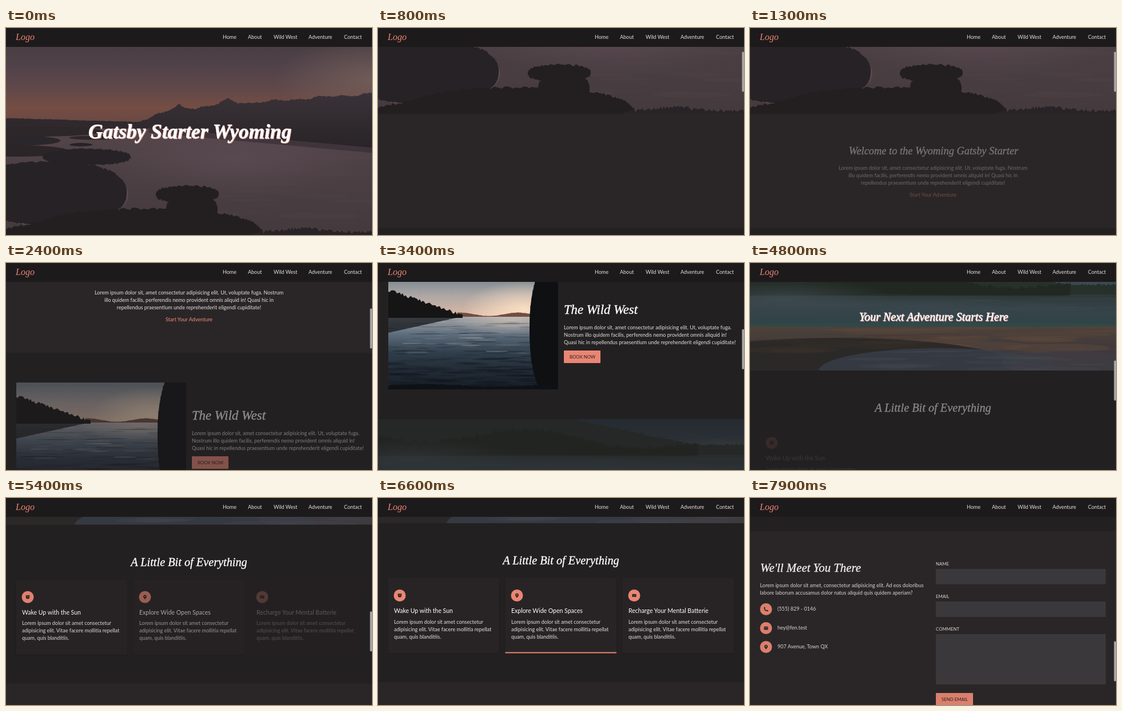
These frames come from a looping animation (640x362 px, 8 s). An HTML page:

```html
<!DOCTYPE html>
<html lang="en">
<head>
<meta charset="utf-8">
<title>Gatsby Starter Wyoming</title>
<style>
html, body { margin: 0; width: 100%; height: 100%; overflow: hidden; background: #232021; }
#stage { display: block; width: 640px; height: 362px; }
text { font: 9px Lato, "Open Sans", sans-serif; fill: #e4e0e0; white-space: pre; }
.script { font-family: "Liberation Serif", "Noto Serif", serif; font-style: italic; fill: #fff; stroke: #fff; stroke-width: .35px; }
.glow { filter: drop-shadow(1px 1px 0 #e9a097); }
.mid { text-anchor: middle; }
.caps { font-size: 7.85px; }
.title { font-size: 10.5px; fill: #fff; }
.dark { fill: #2a2021; }
.link { fill: #ec8e78; }
</style>
</head>
<body>
<svg id="stage" viewBox="0 0 640 362" xmlns="http://www.w3.org/2000/svg"></svg>
<script>
const LOOP = 8000, CORAL = '#e98673', PANEL = '#2a2627', DEEP = '#232021', INK = '#2c2324';

// Timeline: scroll moves (start -> offset), fade-in starts and card hovers
const MOVE = 600, FADE = 700, HOVER = 500;
const MOVES = { 200: 212, 1800: 405, 2750: 590, 3800: 870, 4850: 1014, 7200: 1278 };
const FADES = { welcome: 1050, wild: 2060, spring: 3050, little: 4480, card0: 4730, card1: 4980, card2: 5230, contact: 7250 };
const hoverStart = i => 5700 + HOVER * i;

const ramp = (t, start, length) => Math.max(0, Math.min(1, (t - start) / length));
const smooth = u => u * u * (3 - 2 * u);

function seeded(seed) {
  return () => (seed = (seed * 16807) % 2147483647) / 2147483647;
}

const rect = (x, y, w, h, fill, more = '') =>
  `<rect x="${x}" y="${y}" width="${w}" height="${h}" fill="${fill}" ${more}/>`;
const oval = (x, y, rx, ry, fill, alpha = 1) =>
  `<ellipse cx="${x}" cy="${y}" rx="${rx}" ry="${ry}" fill="${fill}" opacity="${alpha}"/>`;
const text = (x, y, s, cls = '', style = '') =>
  `<text x="${x}" y="${y}" class="${cls}" style="${style}">${s}</text>`;
const lines = (x, y, list, cls) => list.map((s, i) => text(x, y + 13 * i, s, cls)).join('');
const script = (x, y, size, s, cls = '', style = '') =>
  text(x, y, s, 'script ' + cls, `font-size:${size}px;${style}`);
const group = (id, body) => `<g id="${id}">${body}</g>`;
const frame = (x, y, w, h, body) => `<svg x="${x}" y="${y}" width="${w}" height="${h}">${body}</svg>`;

// Colours are spread evenly from top to bottom
const gradient = (id, ...colors) => `<linearGradient id="${id}" x2="0" y2="1">` +
  colors.map((c, i) => `<stop offset="${i / (colors.length - 1)}" stop-color="${c}"/>`).join('') + '</linearGradient>';
const halo = (id, color) => `<radialGradient id="${id}"><stop stop-color="${color}"/>
  <stop offset="1" stop-color="${color}" stop-opacity="0"/></radialGradient>`;

// Land between two curves, its top edge roughened by trees or rock
function ridge(x0, x1, top, bottom, rise, fill, alpha = 1) {
  const rnd = seeded(x0 * 7 + x1 + rise * 100), upper = [], lower = [];
  for (let x = x0; x <= x1; x += 2.5) {
    upper.push(`${x},${(top(x) - rise * rnd()).toFixed(1)}`);
    lower.unshift(`${x},${bottom(x).toFixed(1)}`);
  }
  return `<polygon points="${upper.concat(lower).join(' ')}" fill="${fill}" opacity="${alpha}"/>`;
}

// Wooded oval with a spiky outline
function grove(cx, cy, rx, ry, rise, fill) {
  const rnd = seeded(cx + cy * 3), n = Math.round((rx + ry) * 1.4);
  const pts = Array.from({ length: n }, (_, i) => {
    const a = i / n * 2 * Math.PI;
    const spread = v => Math.sign(v) * Math.abs(v) ** .85;
    return `${(cx + rx * spread(Math.cos(a))).toFixed(1)},${(cy + ry * spread(Math.sin(a)) - rise * rnd()).toFixed(1)}`;
  });
  return `<polygon points="${pts.join(' ')}" fill="${fill}"/>`;
}

// Scattered flat streaks, growing towards the viewer
function streaks(count, x, y, w, h, size, fill, alpha, seed) {
  const rnd = seeded(seed);
  return Array.from({ length: count }, () => {
    const v = rnd(), rx = size * (.4 + rnd());
    return oval((x + w * rnd()).toFixed(1), (y + h * v).toFixed(1), rx.toFixed(1),
      (rx * (.02 + .06 * v)).toFixed(1), fill, (alpha * (.3 + rnd())).toFixed(2));
  }).join('');
}

const defs = `<defs>
  ${gradient('dusk', '#493e43', '#51424a', '#5f484a', '#754d43', '#654744')}
  ${gradient('lake', '#54464b', '#4a3e42', '#443a3d')}
  ${gradient('peak', '#3a3238', '#292428')}
  ${gradient('dawn', '#76868f', '#b0a8a5', '#dcb9a4')}
  ${gradient('water', '#a5a5aa', '#5d6d7c', '#303e4b', '#222b35', '#171d25')}
  ${gradient('sky', '#273642', '#39474e')}
  ${gradient('mist', '#28332f', '#323e42', '#344349', '#2e4446')}
  ${gradient('shore', '#4d433a', '#41393a', '#3a3538')}
  ${halo('warm', '#76605a')}${halo('sheen', '#62515a')}${halo('sun', '#ffe3c6')}${halo('fog', '#46535a')}
</defs>`;

const WOODS = '#272225';
const peaks = x => 172 - 56 * Math.sqrt(Math.max(0, x - 225) / 415)
  - 12 * [302, 388].reduce((sum, p) => sum + Math.exp(-Math.abs(x - p) / 18), 0)
  - 2.5 * Math.sin(x / 9) * Math.sin(x / 23);
const farShore = x => 172 + Math.max(0, x - 225) * .09;

const hero = frame(0, 0, 640, 362,
  rect(0, 33, 640, 142, 'url(#dusk)') +
  oval(640, 90, 170, 75, 'url(#warm)', .8) +
  rect(0, 172, 640, 190, 'url(#lake)') +
  oval(400, 230, 230, 70, 'url(#sheen)', .5) +
  streaks(40, 220, 205, 420, 130, 60, '#5a4b50', .12, 5) +
  ridge(0, 250, x => 158 + x * .03, () => 176, 1, '#2f292d') +
  ridge(225, 640, peaks, farShore, 2.5, 'url(#peak)') +
  ridge(250, 640, farShore, x => farShore(x) + 9, 0, '#332b30', .6) +
  oval(50, 181, 120, 9, '#2d272a') + oval(20, 197, 75, 9, '#2b2629') +
  oval(155, 192, 45, 3.5, '#2d272a') + oval(131, 204, 20, 3, WOODS) + oval(20, 215, 90, 10, '#2b2528') +
  grove(141, 227, 77, 14, 3, WOODS) +
  oval(78, 292, 136, 55, '#594a4d') +
  grove(76, 290, 135, 55, 3, WOODS) +
  grove(317, 293, 55, 15, 4, '#231f21') +
  grove(325, 318, 45, 26, 2, '#231f21') +
  grove(245, 366, 205, 48, 4, '#231f21') +
  ridge(0, 150, x => 352 - x * .18, () => 362, 4, '#231f21') +
  ridge(430, 640, x => 357 + 3 * Math.sin(x / 30), () => 364, 6, '#282326')) +
  script(321.5, 193, 35.4, 'Gatsby Starter Wyoming', 'mid glow', 'font-weight:bold');

const welcome = rect(0, 362, 640, 201, PANEL) + group('welcome',
  script(321, 433, 18.4, 'Welcome to the Wyoming Gatsby Starter', 'mid') +
  lines(320, 459.5, ['Lorem ipsum dolor sit, amet consectetur adipisicing elit. Ut, voluptate fuga. Nostrum',
    'illo quidem facilis, perferendis nemo provident omnis aliquid in! Quasi hic in',
    'repellendus praesentium unde reprehenderit eligendi cupiditate!'], 'mid') +
  text(320, 507, 'Start Your Adventure', 'mid link'));

const button = (y, w, s) => rect(325, y, w, 22, CORAL, 'rx="1"') + text(335, y + 13.8, s, 'caps dark');

const treeline = x => 26 + x * .34;
const sunset = frame(18, 614, 297, 197,
  rect(0, 0, 297, 70, 'url(#dawn)') +
  oval(238, 58, 110, 50, 'url(#sun)', .9) +
  rect(0, 69, 297, 128, 'url(#water)') +
  oval(215, 76, 100, 28, 'url(#sun)', .4) +
  streaks(150, -10, 76, 300, 118, 26, '#10171f', .35, 7) +
  streaks(50, 40, 74, 200, 60, 18, '#c3bbb8', .25, 17) +
  ridge(120, 250, x => 66 - 3 * Math.sin(x / 16), () => 70, .5, '#6f4f42') +
  ridge(0, 130, x => 70, x => 98 - x * .22, 0, '#15191d', .75) +
  ridge(0, 130, treeline, () => 72, 6, '#151515') +
  grove(303, 95, 56, 130, 5, '#0e1012') +
  ridge(0, 297, x => 191 - 2 * Math.sin(x / 40), () => 197, 2, '#0e1116'));

const wild = rect(0, 562, 640, 302, DEEP) + group('wild', sunset +
  script(325, 679, 22.7, 'The Wild West') +
  lines(325, 705.5, ['Lorem ipsum dolor sit, amet consectetur adipisicing elit. Ut, voluptate fuga.',
    'Nostrum illo quidem facilis, perferendis nemo provident omnis aliquid in!',
    'Quasi hic in repellendus praesentium unde reprehenderit eligendi cupiditate!']) +
  button(743, 64, 'BOOK NOW'));

const slope = x => Math.max(-5, Math.min(47, (x - 330) * .21));
const spring = rect(0, 863, 640, 196, DEEP) + group('spring', frame(0, 863, 640, 195,
  rect(0, 0, 640, 60, 'url(#sky)') +
  oval(600, 44, 90, 14, 'url(#fog)', .6) +
  rect(0, 56, 640, 62, 'url(#mist)') +
  ridge(0, 640, slope, () => 62, 4, '#27302b') +
  ridge(0, 560, x => 34 + 10 * Math.sin(x / 55) + slope(x) * .4, () => 64, 7, '#20261f', .8) +
  oval(60, 68, 190, 34, 'url(#fog)', .6) + oval(300, 82, 240, 22, 'url(#fog)', .35) +
  streaks(16, 0, 62, 640, 40, 90, '#3d4a50', .3, 23) +
  rect(0, 116, 640, 79, 'url(#shore)') +
  oval(320, 115, 400, 4, '#30494a', .8) +
  streaks(30, 200, 120, 440, 36, 80, '#5c473b', .4, 29) +
  oval(150, 186, 310, 48, '#2b2926', .95) +
  streaks(14, 0, 132, 330, 30, 70, '#3a3029', .5, 31) +
  oval(330, 196, 210, 40, '#383f49', .8) +
  oval(560, 182, 120, 22, '#403f47', .6) +
  streaks(24, 180, 158, 420, 36, 50, '#4a4f58', .25, 37)) +
  script(321, 971, 20, 'Your Next Adventure Starts Here', 'mid glow'));

// Small glyphs centred on the origin
const mark = (d, width = .7, color = CORAL) => `<path d="${d}" fill="none" stroke="${color}" stroke-width="${width}"/>`;
const GLYPHS = {
  clock: oval(0, 0, 3.2, 3.2, INK) + mark('M-3.6-2.2L-2-3.6M3.6-2.2L2-3.6', 1, INK) + mark('M0-1.6V.3H1.4'),
  pin: `<path d="M0 4.2L-2.7 .6A3 3 0 1 1 2.7 .6Z" fill="${INK}"/>` + oval(0, -.9, 1.1, 1.1, CORAL),
  power: rect(-3.6, -2.6, 7.2, 5.2, INK, 'rx=".8"') + mark('M-1.8 .2L-.4 1.2L1.6-1.2'),
  phone: mark('M-2.9-2.6Q-2.6 2.6 2.6 2.9', 1.5, INK) + mark('M-3.3-2.3L-1.5-2.9M2.3 3.3L2.9 1.5', 2.2, INK),
  mail: rect(-3.6, -2.7, 7.2, 5.6, INK, 'rx=".7"') + mark('M-3.2-1.7L0 .5L3.2-1.7')
};
const badge = (x, y, name) =>
  `<g transform="translate(${x} ${y})">${oval(0, 0, 10.5, 10.5, CORAL)}${GLYPHS[name]}</g>`;

const CARDS = [['clock', 'Wake Up with the Sun'], ['pin', 'Explore Wide Open Spaces'], ['power', 'Recharge Your Mental Batterie']];
function card([icon, title], i) {
  const x = 17.5 + 205 * i;
  return group('card' + i,
    rect(x - 1, 1154, 196.5, 133, '#1d1a1b', 'rx="2" opacity=".5"') +
    rect(x, 1154, 194.5, 131.5, '#282425') +
    badge(x + 20.5, 1184.5, icon) +
    text(x + 10.5, 1215, title, 'title') +
    lines(x + 10.5, 1233.5, ['Lorem ipsum dolor sit amet consectetur',
      'adipisicing elit. Vitae facere mollitia repellat', 'quam, quis blanditiis.']) +
    rect(x, 1283.5, 0, 2, CORAL, `id="bar${i}"`));
}
const cards = rect(0, 1058, 640, 279, DEEP) +
  group('little', script(320, 1130, 20.3, 'A Little Bit of Everything', 'mid')) +
  CARDS.map(card).join('');

const field = (y, h, label) => text(325, y - 6, label, 'caps') + rect(325, y, 297, h, '#3d3a3d');
const DETAILS = [['phone', '(555) 829 - 0146'], ['mail', 'hey@fen.test'], ['pin', '907 Avenue, Town QX']];
const contact = rect(0, 1336, 640, 540, PANEL) + group('contact',
  script(18, 1407, 20.8, "We'll Meet You There") +
  lines(17.5, 1433.5, ['Lorem ipsum dolor sit amet, consectetur adipisicing elit. Ad eos doloribus',
    'labore laborum accusamus dolor natus aliquid quis quidem aperiam?']) +
  DETAILS.map(([icon, s], i) => badge(28, 1472.5 + 33 * i, icon) + text(48, 1475.3 + 33 * i, s)).join('') +
  field(1402, 27, 'NAME') + field(1459, 27, 'EMAIL') + field(1516, 88, 'COMMENT') +
  button(1619, 65, 'SEND EMAIL'));

const LINKS = { Home: 379, About: 423, 'Wild West': 468, Adventure: 529, Contact: 591 };
const nav = rect(0, 0, 640, 33, '#1d1a1c') +
  script(17, 21, 16, 'Logo', '', `fill:${CORAL};stroke:none`) +
  Object.entries(LINKS).map(([s, x]) => text(x, 19, s)).join('');

document.getElementById('stage').innerHTML = defs + rect(0, 0, 640, 362, DEEP) +
  group('page', hero + welcome + wild + spring + cards + contact) + nav +
  rect(636.5, 0, 3.5, 70, '#a9a6a7', 'rx="1.5" id="thumb"');

const el = id => document.getElementById(id);
const page = el('page'), thumb = el('thumb');
const fades = Object.entries(FADES).map(([id, start]) => [el(id), start]);
const bars = CARDS.map((_, i) => el('bar' + i));

const scrollAt = t => Object.entries(MOVES).reduce(
  (y, [start, goal]) => y + (goal - y) * smooth(ramp(t, +start, MOVE)), 0);

// The scrollbar thumb shows while the page is on the move
const thumbAt = t => ramp(t, 100, 100) - ramp(t, 5600, 300) + ramp(t, 7100, 100);

function draw(t) {
  const y = scrollAt(t);
  page.setAttribute('transform', `translate(0 ${-y.toFixed(2)})`);
  thumb.setAttribute('y', y / 5.1);
  thumb.setAttribute('opacity', thumbAt(t));
  fades.forEach(([node, start]) => node.setAttribute('opacity', ramp(t, start, FADE)));
  bars.forEach((bar, i) => {
    const open = ramp(t, hoverStart(i), 250) - ramp(t, hoverStart(i + 1), 250);
    bar.setAttribute('width', 194.5 * smooth(open));
  });
}

const start = performance.now();
function tick() {
  draw((performance.now() - start) % LOOP);
  requestAnimationFrame(tick);
}
tick();
</script>
</body>
</html>
```
